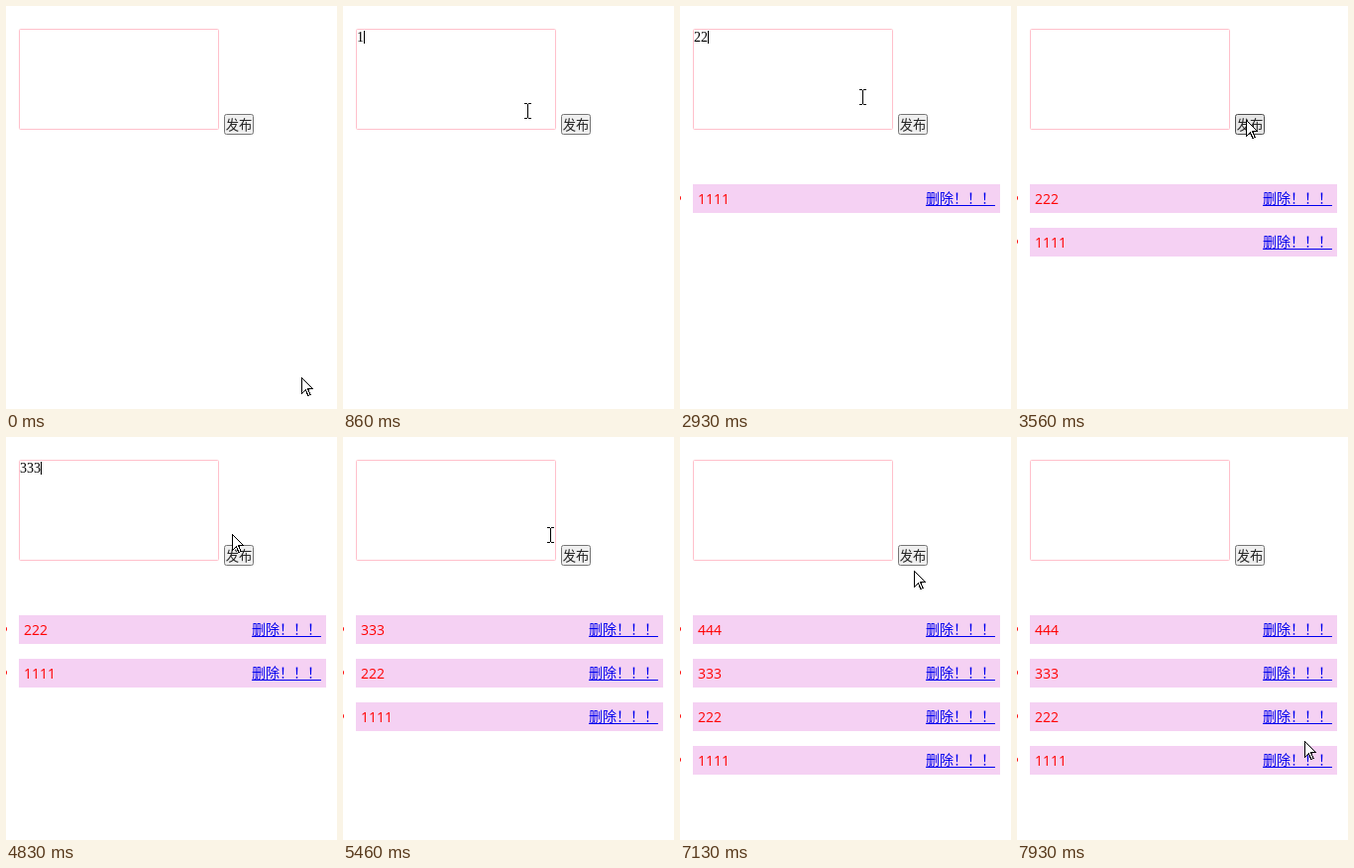
An HTML page that plays this animation: 334x407 px, repeating every 8 s.

```html
<!DOCTYPE html>
<html lang="zh-CN">
<head>
<meta charset="utf-8">
<title>发布留言</title>
<style>
  html, body { margin: 0; width: 100%; height: 100%; overflow: hidden; background: #fff; }
  svg { display: block; }
  #draft { font: 14px "Liberation Serif", serif; }
  #button text { font-size: 13.33px; fill: #222; }
  #button rect { fill: #efefef; stroke: #767676; }
  #button.hover rect { fill: #e5e5e5; stroke: #4f4f4f; }
  #button.pressed rect { fill: #f5f5f5; stroke: #8d8d8d; }
  .post { fill: #f00; }
  .post rect { fill: rgb(245, 209, 243); }
  .post text { font: 14px "Open Sans", "Noto Sans", sans-serif; }
  .post .link { fill: #00e; }
  #button text, .post text.link { font-family: "Noto Sans CJK SC", "Noto Sans CJK", sans-serif; font-weight: 300; }
  #arrow, #beam { shape-rendering: crispEdges; stroke: #000; }
</style>
</head>
<body>
<svg width="334" height="407" viewBox="0 0 334 407">
  <rect x="13.5" y="23.5" width="201" height="101" rx="1" fill="#fff" stroke="pink"/>
  <text id="draft" x="14" y="36"></text>
  <rect id="caret" y="25" width="1" height="13"/>
  <g id="button">
    <rect x="220.5" y="109.5" width="29" height="20" rx="2"/>
    <text x="221.7" y="125">发布</text>
  </g>
  <g id="posts"></g>
  <path id="arrow" d="M.5 .5V16.5L4.3 12.8 7 18.5 9.2 17.5 6.7 11.8H11.7Z" fill="#fff"/>
  <path id="beam" d="M-3-7.5h3M1-7.5h3M.5-7V7M-3 7.5h3M1 7.5h3" fill="none"/>
</svg>
<script>
const LOOP = 8000, TICK = 79.4, START = 70;
const KEY_DELAY = 160, KEY_GAP = 120, POST_DELAY = 155, TRAVEL = 450;
const $ = id => document.getElementById(id);

// Each round: click into the box, type, leave for the button, press it.
const rounds = [
  { text: '1111', focus: 690, leave: 1250, press: 1970, click: [186, 106], aim: [231, 121] },
  { text: '222', focus: 2600, leave: 3000, press: 3400, click: [184, 92], aim: [231, 115] },
  { text: '333', focus: 4030, leave: 4440, press: 5145, click: [186, 98], aim: [231, 113] },
  { text: '444', focus: 5940, leave: 6500, press: 6900, click: [163, 68], rest: [190, 86], aim: [231, 121] }
];

const keyTime = (round, i) => round.focus + KEY_DELAY + KEY_GAP * i;
const postTime = round => round.press + POST_DELAY;

// Pointer stops follow from the rounds: box, pause, near the button, on it.
const path = [];
const stop = (time, [x, y]) => path.push({ time, x, y });
stop(0, [298, 375]);
for (const round of rounds) {
  const { click, rest = click, aim, leave, press, text } = round;
  stop(path[path.length - 1].time + TRAVEL, click);
  stop(keyTime(round, text.length - 1), click);
  stop(leave, rest);
  stop(press - 311, [aim[0] - 3, aim[1] - 15]);
  stop(press - 160, aim);
  stop(postTime(round), aim);
}
stop(7530, [294, 295]);
stop(7620, [294, 295]);
stop(7920, [290, 307]);

function pointerAt(t) {
  const i = path.findIndex(s => s.time > t);
  const b = path[i < 0 ? path.length - 1 : i];
  if (i < 0) return [b.x, b.y];
  const a = path[i - 1];
  const u = (t - a.time) / (b.time - a.time), ease = u * u * (3 - 2 * u);
  return [Math.round(a.x + (b.x - a.x) * ease), Math.round(a.y + (b.y - a.y) * ease)];
}

const posts = rounds.map(({ text }) => {
  const g = document.createElementNS('http://www.w3.org/2000/svg', 'g');
  g.setAttribute('class', 'post');
  g.innerHTML = `<circle cx="-1.5" cy="14" r="2.5"/><rect x="13" width="310" height="29"/>
    <text x="18" y="20">${text}</text><text class="link" x="248" y="19">删除！！！</text>
    <path class="link" d="M248 21h70v1h-70z"/>`;
  $('posts').append(g);
  return g;
});

const show = (el, on) => el.setAttribute('visibility', on ? 'visible' : 'hidden');
const place = (el, x, y) => el.setAttribute('transform', `translate(${x} ${y})`);

function render(time) {
  // The screen refreshes in fixed ticks.
  const t = Math.max(0, START + TICK * Math.floor((time - START + 15) / TICK));
  const count = rounds.filter(r => t >= postTime(r)).length;
  const round = rounds[count];
  const draft = round ? [...round.text].filter((_, i) => t >= keyTime(round, i)).join('') : '';

  $('draft').textContent = draft;
  $('caret').setAttribute('x', 14 + 7 * draft.length);
  show($('caret'), round && t >= round.focus && t < round.press);

  posts.forEach((post, i) => {
    show(post, i < count);
    place(post, 0, 180 + 44 * (count - 1 - i));
  });

  const [x, y] = pointerAt(t);
  const inBox = x > 13 && x < 215 && y > 23 && y < 125;
  const hover = x >= 220 && x < 250 && y >= 109 && y < 130;
  show($('beam'), inBox);
  show($('arrow'), !inBox);
  place($('beam'), x, y);
  place($('arrow'), x, y);
  $('button').setAttribute('class', round && t >= round.press ? 'pressed' : hover ? 'hover' : '');
}

function frame() {
  render(performance.now() % LOOP);
  requestAnimationFrame(frame);
}
frame();
</script>
</body>
</html>
```
